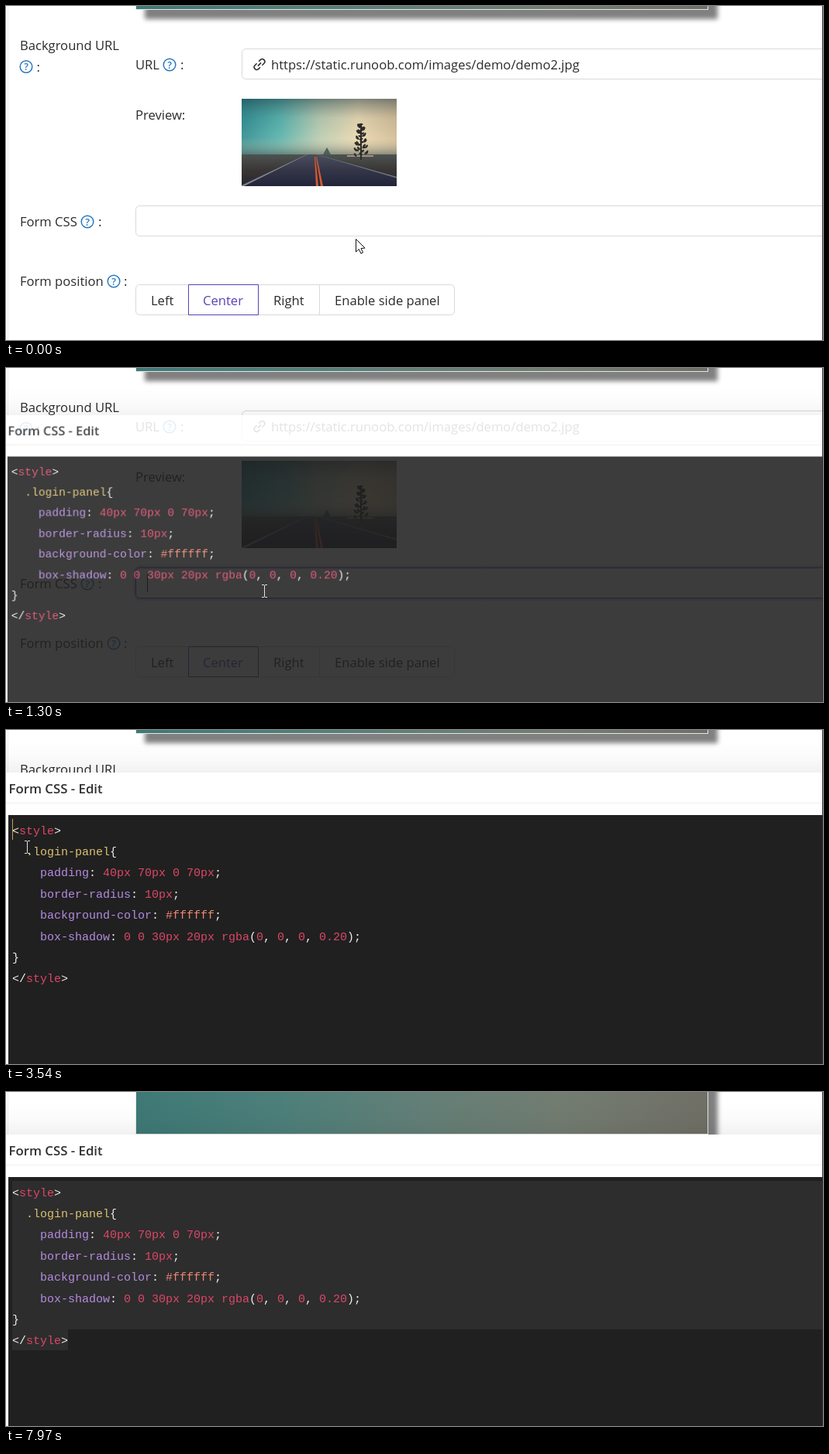
Recreate the animation shown at these times as an HTML page with a canvas. Size 1054 px wide and 432 px high, loop 8000 ms.

```html
<!DOCTYPE html>
<html lang="en">
<head>
<meta charset="utf-8">
<title>Form CSS editor</title>
<style>
html, body { margin: 0; width: 100%; height: 100%; overflow: hidden; background: #fff; }
canvas { display: block; }
</style>
</head>
<body>
<canvas id="stage" width="1054" height="432"></canvas>
<script>
const LOOP = 8000;
const canvas = document.getElementById('stage');
const screen = canvas.getContext('2d');
const layer = Object.assign(document.createElement('canvas'), { width: 1180, height: 500 });
const modal = layer.getContext('2d');

const UI = '16.6px "Open Sans", "Noto Sans", sans-serif';
const TITLE = '600 16.8px "Open Sans", "Noto Sans", sans-serif';
const CODE = '15px "Liberation Mono", monospace';
const INK = '#2b2b2b', PURPLE = '#5a40b8', LINE = '#d9d9d9';
const PALETTE = { w: '#eeeeee', r: '#dd4668', y: '#dcc070', p: '#b48be0', o: '#ee8672' };

// Each token is a colour key followed by its text.
const SOURCE = [
  ['w<', 'rstyle', 'w>'],
  ['y  .login-panel', 'w{'],
  ['p    padding', 'w: ', 'r40px 70px 0 70px', 'w;'],
  ['p    border-radius', 'w: ', 'r10px', 'w;'],
  ['p    background-color', 'w: ', 'o#ffffff', 'w;'],
  ['p    box-shadow', 'w: ', 'r0 0 30px 20px rgba', 'w(', 'r0', 'w, ', 'r0', 'w, ', 'r0', 'w, ', 'r0.20', 'w);'],
  ['w}'],
  ['w</', 'rstyle', 'w>']
];
const LENGTHS = SOURCE.map(row => row.reduce((n, s) => n + s.length - 1, 0));
const CODE_X = 8, CODE_Y = 115, ROW = 27.4, CHAR = 9;

// Pointer path: time, x, y
const PATH = [
  [0, 451, 301], [160, 451, 301], [640, 333, 288], [1660, 333, 288],
  [2040, 200, 333], [2440, 78, 320], [2720, 60, 240], [3160, 11, 130],
  [3380, 10, 133], [3540, 27, 151], [3960, 246, 343], [4920, 246, 343],
  [5400, 158, 337], [5900, 241, 337], [6200, 241, 330], [6800, 241, 330],
  [7320, 1036, 380], [7440, 1064, 378]
];
const HOVER = 440, FOCUS = 1080, OPEN = 1234, CLICK = 3200;
const SELECT = 3560, SELECTED = 3980, SCROLL = 6080;

const clamp = v => Math.min(1, Math.max(0, v));
const progress = (t, start, length) => clamp((t - start) / length);
const smooth = p => p * p * (3 - 2 * p);

function pointerAt(t) {
  const i = PATH.findIndex(k => k[0] > t);
  if (i < 0) return PATH[PATH.length - 1].slice(1);
  const a = PATH[i - 1], b = PATH[i], p = smooth(progress(t, a[0], b[0] - a[0]));
  return [a[1] + (b[1] - a[1]) * p, a[2] + (b[2] - a[2]) * p];
}

function rect(c, color, x, y, w, h) {
  c.fillStyle = color;
  c.fillRect(x, y, w, h);
}

function text(c, str, x, y, color = INK, font = UI) {
  c.font = font;
  c.fillStyle = color;
  c.fillText(str, x, y);
}

function box(c, x, y, w, h, radius, color) {
  c.beginPath();
  c.roundRect(x + .5, y + .5, w, h, radius);
  c.lineWidth = 1;
  c.strokeStyle = color;
  c.stroke();
}

function poly(c, color, ...points) {
  c.beginPath();
  points.forEach(p => c.lineTo(...p));
  c.closePath();
  c.fillStyle = color;
  c.fill();
}

function gradient(c, x0, y0, x1, y1, ...colors) {
  const g = c.createLinearGradient(x0, y0, x1, y1);
  colors.forEach((color, i) => g.addColorStop(i / (colors.length - 1), color));
  return g;
}

function help(c, x, y) {
  c.beginPath();
  c.arc(x, y, 7.8, 0, 7);
  c.strokeStyle = '#2878c0';
  c.lineWidth = 1.5;
  c.stroke();
  c.textAlign = 'center';
  text(c, '?', x, y + 4.6, '#2878c0', '600 12.5px "Open Sans", sans-serif');
  c.textAlign = 'left';
}

function linkIcon(c, x, y) {
  c.save();
  c.translate(x, y);
  c.rotate(-Math.PI / 4);
  c.strokeStyle = INK;
  c.lineWidth = 1.5;
  for (const side of [-1, 1]) {
    c.beginPath();
    c.moveTo(side * 1.5, side * 3.3);
    c.lineTo(side * 5, side * 3.3);
    c.arc(side * 5, 0, 3.3, side * Math.PI / 2, -side * Math.PI / 2, true);
    c.lineTo(side * 2, -side * 3.3);
    c.stroke();
  }
  c.beginPath();
  c.moveTo(-3, 0);
  c.lineTo(3, 0);
  c.stroke();
  c.restore();
}

function tree(c) {
  rect(c, '#2d2c2a', 153, 32, 2, 47);
  for (let i = 0; i < 34; i++) {
    const spread = 3 + i * .17;
    c.beginPath();
    c.ellipse(154 + Math.sin(i * 5.3) * spread, 33 + i * 1.2, 2.6, 1.3, Math.sin(i), 0, 7);
    c.fill();
  }
}

function photo(c) {
  c.save();
  c.translate(304, 120);
  c.beginPath();
  c.rect(0, 0, 200, 113);
  c.clip();
  rect(c, gradient(c, 0, 0, 200, 0, '#2f8f95', '#58b4b0', '#b9cdb4', '#ecdab4', '#d3bd98'), 0, 0, 200, 76);
  rect(c, gradient(c, 0, 0, 0, 76, 'rgba(25,50,60,.5)', 'rgba(70,90,90,.1)', 'rgba(240,225,190,.1)', 'rgba(70,85,85,.75)'), 0, 0, 200, 76);
  rect(c, gradient(c, 0, 72, 0, 113, '#4c5350', '#3a3535', '#262630'), 0, 72, 200, 41);
  poly(c, gradient(c, 0, 72, 0, 113, '#4b4f5e', '#343648', '#22243a'), [84, 72], [97, 72], [200, 101], [200, 113], [0, 113], [0, 110]);
  poly(c, '#85888a', [84, 72], [85, 72], [3, 113], [-2, 113]);
  poly(c, '#7b7f84', [96, 72], [97, 72], [200, 101], [200, 102.5]);
  poly(c, '#d85a30', [94, 75], [95, 75], [99, 113], [96, 113]);
  poly(c, '#d85a30', [96, 75], [97, 75], [105, 113], [102, 113]);
  poly(c, '#4a6060', [105, 72], [110, 63], [115, 72]);
  rect(c, 'rgba(225,190,160,.6)', 136, 73, 34, 2);
  tree(c);
  c.restore();
}

function banner(c, bottom) {
  c.save();
  c.shadowColor = '#808080';
  c.shadowBlur = 6;
  c.shadowOffsetX = c.shadowOffsetY = 12;
  rect(c, '#e4e6e4', 167, bottom - 400, 739, 400);
  c.restore();
  rect(c, gradient(c, 168, 0, 905, 0, '#3e7976', '#4d7f7a', '#637f77', '#737c71', '#706f66'), 168, bottom - 400, 737, 399);
}

function page(c, t) {
  rect(c, '#fff', 0, 0, 1054, 432);
  c.save();
  c.translate(0, Math.round(50 * smooth(progress(t, SCROLL, 160))));
  banner(c, 5);

  text(c, 'Background URL', 18, 57);
  help(c, 26, 78.5);
  text(c, ':', 39.5, 85);
  text(c, 'URL', 167, 82);
  help(c, 211, 76);
  text(c, ':', 225, 82);
  box(c, 304, 55, 800, 39, 5, LINE);
  linkIcon(c, 327, 75.5);
  text(c, 'https://static.runoob.com/images/demo/demo2.jpg', 342, 82);
  text(c, 'Preview:', 167, 147);
  photo(c);

  text(c, 'Form CSS', 18, 285);
  help(c, 105, 279);
  text(c, ':', 119, 285);
  if (t >= FOCUS) {
    c.beginPath();
    c.roundRect(166, 257, 940, 42, 7);
    c.strokeStyle = '#cfc6f0';
    c.lineWidth = 3;
    c.stroke();
    rect(c, '#111', 182, 267, 1, 23);
  }
  box(c, 167, 258, 940, 39, 5, t < HOVER ? LINE : PURPLE);

  text(c, 'Form position', 18, 362);
  help(c, 139, 356);
  text(c, ':', 152, 362);
  box(c, 167, 360, 411, 39, 5, LINE);
  rect(c, LINE, 404, 360, 1, 39);
  box(c, 235, 360, 90, 39, 0, PURPLE);
  text(c, 'Left', 187, 387);
  text(c, 'Center', 254, 387, PURPLE);
  text(c, 'Right', 345, 387);
  text(c, 'Enable side panel', 424, 387);
  c.restore();
  rect(c, '#ececec', 2, 0, 1, 432);
}

function selection(c, t, [x, y]) {
  let row = Math.floor((y - CODE_Y) / ROW);
  let col = Math.max(0, Math.round((x - CODE_X) / CHAR));
  if (t >= SELECTED || row >= SOURCE.length) {
    row = SOURCE.length - 1;
    col = LENGTHS[row];
  }
  const top = Math.round(CODE_Y + row * ROW);
  rect(c, '#2d2d2d', 8, CODE_Y, 1118, top - CODE_Y);
  rect(c, '#2d2d2d', 8, top, Math.min(col, LENGTHS[row]) * CHAR, 27);
}

function dialog(c, t, pointer) {
  c.clearRect(0, 0, layer.width, layer.height);
  rect(c, gradient(c, 0, 14, 0, 55, 'rgba(0,0,0,0)', 'rgba(0,0,0,.015)', 'rgba(0,0,0,.055)'), 0, 14, 1146, 41);
  rect(c, gradient(c, 1146, 0, 1180, 0, 'rgba(0,0,0,.05)', 'rgba(0,0,0,0)'), 1146, 55, 34, 445);
  rect(c, '#fff', 0, 55, 1146, 445);
  rect(c, '#f0f0f0', 0, 94, 1146, 1);
  text(c, 'Form CSS - Edit', 3.5, 82, '#303030', TITLE);
  rect(c, '#202020', 3, 110, 1123, 390);
  if (t > SELECT) selection(c, t, pointer);

  SOURCE.forEach((row, i) => {
    let x = CODE_X;
    for (const token of row) {
      text(c, token.slice(1), x, 134.5 + i * ROW, PALETTE[token[0]], CODE);
      x += (token.length - 1) * CHAR;
    }
  });
  if (t >= CLICK && t <= SELECT) rect(c, '#c6a24c', 8, 115, 1, 27);
}

function arrow(c, x, y) {
  const shape = [[0, 0], [0, 16.5], [3.8, 13], [6.4, 18.6], [9, 17.4], [6.5, 12], [11.6, 11.6]];
  poly(c, '#fff', ...shape.map(([dx, dy]) => [x + .5 + dx, y + .5 + dy]));
  c.strokeStyle = '#111';
  c.lineWidth = 1;
  c.stroke();
}

function beam(c, x, y, color) {
  x = Math.round(x);
  y = Math.round(y);
  rect(c, color, x, y - 7, 1, 15);
  for (const dy of [-8, 8]) {
    rect(c, color, x - 3, y + dy, 3, 1);
    rect(c, color, x + 1, y + dy, 3, 1);
  }
}

function draw(t) {
  const pointer = pointerAt(t);
  const shown = 1 - (1 - progress(t, OPEN, 200)) ** 5;
  page(screen, t);

  if (shown > 0) {
    dialog(modal, t, pointer);
    const scale = .8 + .2 * shown;
    screen.save();
    screen.globalAlpha = shown;
    screen.translate(-41 * (1 - scale), 281 * (1 - scale));
    screen.scale(scale, scale);
    screen.drawImage(layer, 0, 0);
    screen.restore();
  }
  rect(screen, '#333', 1053, 0, 1, 432);

  const [x, y] = pointer;
  const overText = shown > 0 ? y > 110 && y < 339 : y < 298;
  if (overText) beam(screen, x, y, shown > .8 ? '#e4e4e4' : shown > 0 ? '#686868' : '#222');
  else arrow(screen, x, y);
}

function tick(now) {
  draw(now % LOOP);
  requestAnimationFrame(tick);
}
draw(0);
requestAnimationFrame(tick);
</script>
</body>
</html>
```
